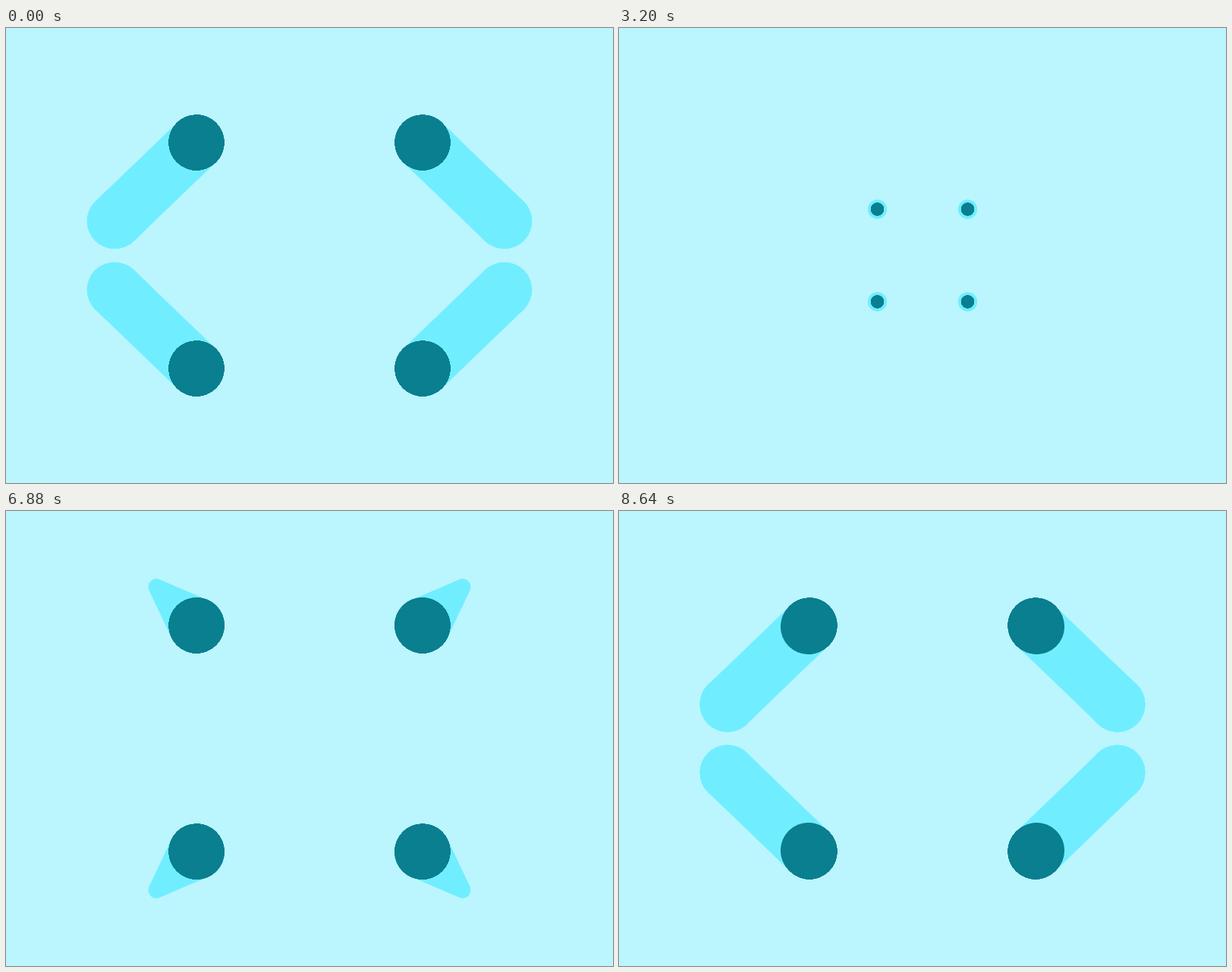
An HTML page without scripts for the animation above (8680 ms loop, 800 px wide and 600 px high).

```html
<!DOCTYPE html>
<html lang="en">
<head>
<meta charset="utf-8">
<title>Four dots</title>
<style>
html, body { margin: 0; width: 100%; height: 100%; overflow: hidden; background: #bbf5fe; }
svg { display: block; width: 100vw; height: 100vh; }

/* Every circle repeats the same trip, one step later than the one before it. */
circle {
  animation: move 8680ms infinite, size 8680ms infinite;
  animation-timing-function: cubic-bezier(.37, 0, .63, 1);
  animation-delay: calc((var(--ones) + var(--eights)) * var(--step) - 8680ms);
  --eights: 0;
}
.trail { --step: 14ms; fill: #70eeff; }
.dot { --step: 5ms; fill: #0a7f8f; }

/* Place in the row = ones + eights */
circle:nth-child(8n+1) { --ones: 0; }
circle:nth-child(8n+2) { --ones: 1; }
circle:nth-child(8n+3) { --ones: 2; }
circle:nth-child(8n+4) { --ones: 3; }
circle:nth-child(8n+5) { --ones: 4; }
circle:nth-child(8n+6) { --ones: 5; }
circle:nth-child(8n+7) { --ones: 6; }
circle:nth-child(8n+8) { --ones: 7; }
circle:nth-child(n+9) { --eights: 8; }
circle:nth-child(n+17) { --eights: 16; }
circle:nth-child(n+25) { --eights: 24; }
circle:nth-child(n+33) { --eights: 32; }
circle:nth-child(n+41) { --eights: 40; }

@keyframes move {
  0%, 3.34% { cx: 251px; cy: 151px; }
  9.1%, 13.04% { cx: 400px; cy: 299px; }
  18.8% { cx: 340.5px; cy: 239px; }
  37.33% { cx: 340.5px; cy: 239px; animation-timing-function: ease-in; }
  39.63% { cx: 285px; cy: 238px; animation-timing-function: linear; }
  40.55% { cx: 254px; cy: 230px; animation-timing-function: linear; }
  42.63% { cx: 249px; cy: 190px; animation-timing-function: linear; }
  44.7% { cx: 244px; cy: 150px; animation-timing-function: linear; }
  46.77% { cx: 236px; cy: 137px; animation-timing-function: linear; }
  48.62% { cx: 226px; cy: 124px; animation-timing-function: linear; }
  50.35% { cx: 207.5px; cy: 104.5px; animation-timing-function: linear; }
  51.15% { cx: 184px; cy: 81px; animation-timing-function: ease-out; }
  53.46%, 59.79% { cx: 146.5px; cy: 46px; }
  65.55%, 71.89% { cx: 194.5px; cy: 96.5px; }
  77.65%, 79.03% { cx: 251px; cy: 151px; }
  84.79%, 86.46% { cx: 355.5px; cy: 45px; }
  93.32%, 93.43% { cx: 143px; cy: 255px; }
  99.19%, 100% { cx: 251px; cy: 151px; }
}

@keyframes size {
  0%, 10.6% { r: 36.5px; }
  14.29% { r: 19px; }
  24.42% { r: 19px; animation-timing-function: linear; }
  30.41% { r: 12.5px; animation-timing-function: linear; }
  36.87% { r: 8px; animation-timing-function: linear; }
  40.55% { r: 5px; animation-timing-function: linear; }
  44.7% { r: 2.6px; animation-timing-function: linear; }
  50.35% { r: 3.2px; animation-timing-function: linear; }
  51.15% { r: 8.4px; animation-timing-function: linear; }
  53% { r: 22px; animation-timing-function: linear; }
  55.3% { r: 32px; animation-timing-function: ease-out; }
  59.56% { r: 36.5px; }
  65.32%, 71.89% { r: 8.8px; }
  77.65%, 100% { r: 36.5px; }
}
</style>
</head>
<body>
<svg viewBox="0 0 800 600">
  <g class="trail">
    <circle/><circle/><circle/><circle/><circle/><circle/><circle/><circle/>
    <circle/><circle/><circle/><circle/><circle/><circle/><circle/><circle/>
    <circle/><circle/><circle/><circle/><circle/><circle/><circle/><circle/>
    <circle/><circle/><circle/><circle/><circle/><circle/><circle/><circle/>
    <circle/><circle/><circle/><circle/><circle/><circle/><circle/><circle/>
    <circle/>
  </g>
  <g class="trail" transform="matrix(-1 0 0 1 800 0)">
    <circle/><circle/><circle/><circle/><circle/><circle/><circle/><circle/>
    <circle/><circle/><circle/><circle/><circle/><circle/><circle/><circle/>
    <circle/><circle/><circle/><circle/><circle/><circle/><circle/><circle/>
    <circle/><circle/><circle/><circle/><circle/><circle/><circle/><circle/>
    <circle/><circle/><circle/><circle/><circle/><circle/><circle/><circle/>
    <circle/>
  </g>
  <g class="trail" transform="matrix(1 0 0 -1 0 600)">
    <circle/><circle/><circle/><circle/><circle/><circle/><circle/><circle/>
    <circle/><circle/><circle/><circle/><circle/><circle/><circle/><circle/>
    <circle/><circle/><circle/><circle/><circle/><circle/><circle/><circle/>
    <circle/><circle/><circle/><circle/><circle/><circle/><circle/><circle/>
    <circle/><circle/><circle/><circle/><circle/><circle/><circle/><circle/>
    <circle/>
  </g>
  <g class="trail" transform="matrix(-1 0 0 -1 800 600)">
    <circle/><circle/><circle/><circle/><circle/><circle/><circle/><circle/>
    <circle/><circle/><circle/><circle/><circle/><circle/><circle/><circle/>
    <circle/><circle/><circle/><circle/><circle/><circle/><circle/><circle/>
    <circle/><circle/><circle/><circle/><circle/><circle/><circle/><circle/>
    <circle/><circle/><circle/><circle/><circle/><circle/><circle/><circle/>
    <circle/>
  </g>

  <g class="dot">
    <circle/><circle/><circle/><circle/><circle/><circle/><circle/><circle/>
    <circle/><circle/><circle/><circle/><circle/><circle/><circle/>
  </g>
  <g class="dot" transform="matrix(-1 0 0 1 800 0)">
    <circle/><circle/><circle/><circle/><circle/><circle/><circle/><circle/>
    <circle/><circle/><circle/><circle/><circle/><circle/><circle/>
  </g>
  <g class="dot" transform="matrix(1 0 0 -1 0 600)">
    <circle/><circle/><circle/><circle/><circle/><circle/><circle/><circle/>
    <circle/><circle/><circle/><circle/><circle/><circle/><circle/>
  </g>
  <g class="dot" transform="matrix(-1 0 0 -1 800 600)">
    <circle/><circle/><circle/><circle/><circle/><circle/><circle/><circle/>
    <circle/><circle/><circle/><circle/><circle/><circle/><circle/>
  </g>
</svg>
</body>
</html>
```
